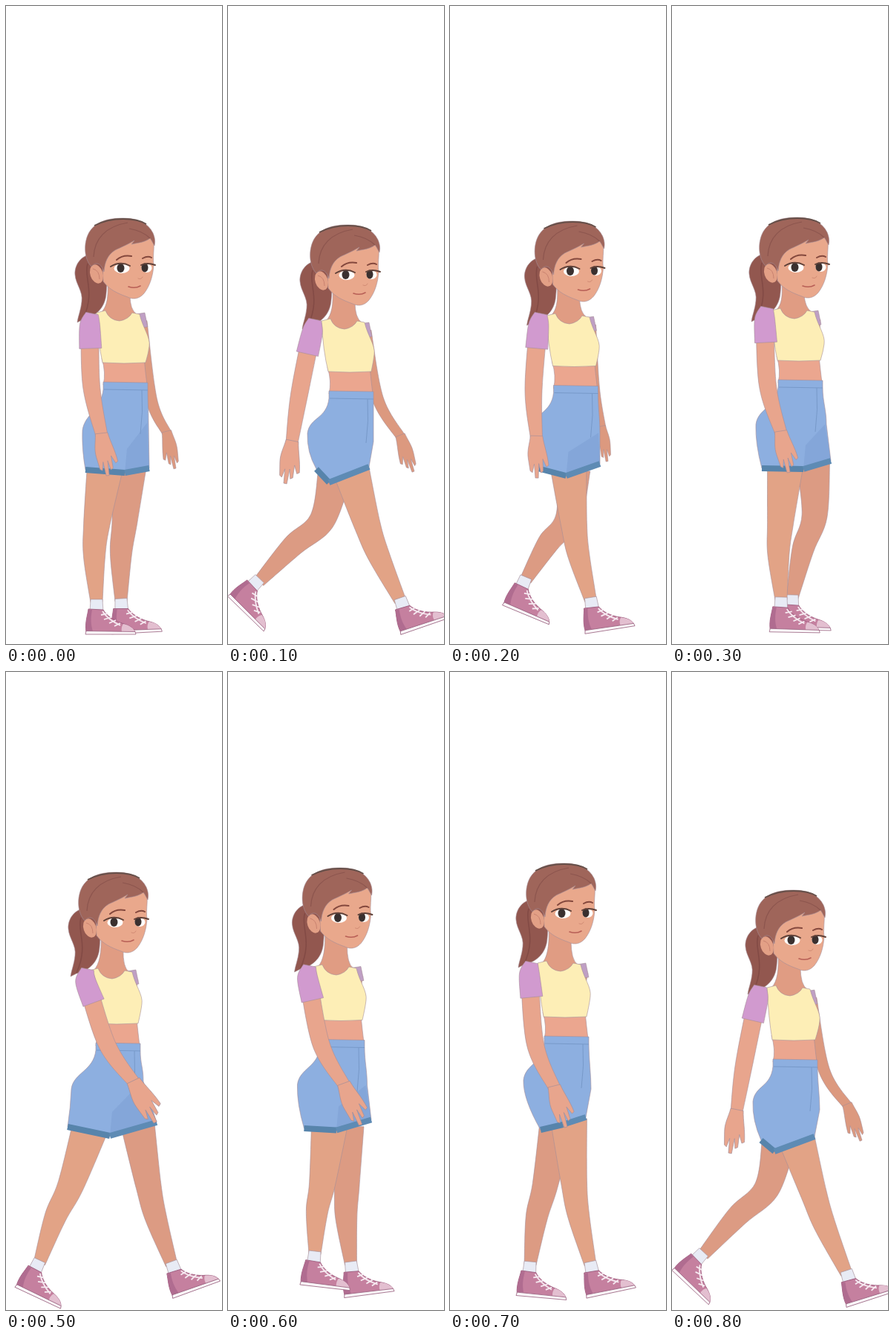
An HTML page that plays this animation: 291 px wide and 857 px high, repeating every 0.9 s.

```html
<!DOCTYPE html>
<html lang="en">
<head>
<meta charset="utf-8">
<title>Walk cycle</title>
<style>
html, body { margin: 0; width: 100%; height: 100%; overflow: hidden; background: #fff; }
svg { display: block; width: 100vw; height: 100vh; }
.line { stroke: #a58e98; stroke-width: .6; stroke-linejoin: round; }
</style>
</head>
<body>
<svg viewBox="0 0 291 857">
  <defs>
    <g id="shoe">
      <path class="line" fill="#e8ebf5" d="M-8 -1L8 -1L9 16L-9 16Z"/>
      <path fill="#c5809f" stroke="#99577a" stroke-width=".8" d="M-11 12L9 13C13 20 22 27 34 31C45 34 50 38 52 43L-14 43C-16 31 -12 20 -11 12Z"/>
      <path fill="#b06c90" d="M-11 13L-6 13C-8 24 -8 32 -5 42L-14 42C-15 31 -13 22 -11 13Z"/>
      <path fill="#e3bfd0" d="M36 32C45 34 50 38 52 43L34 43C33 38 34 35 36 32Z"/>
      <path fill="none" stroke="#f6eaf1" stroke-width="1.8" d="M8 15Q15 26 32 34M6 20L15 18M10 26L20 23M17 31L26 27M24 35L32 31"/>
      <path fill="#fbf8fa" stroke="#9a6380" stroke-width=".8" d="M-14 41.500L52 42.500L53 46L-15 46Z"/>
    </g>
    <path id="hand" class="line" d="M-8 -3C-9 9 -12 16 -10 27L-7 43L-4 45L-2 34L0 52L4 52L4 33L7 45L10 43L9 27L14 37L17 35C15 20 10 9 8 -3Z"/>
  </defs>

  <g id="tail">
    <path class="line" fill="#92574f" d="M116 333C101 335 92 348 93 361C94 374 104 383 102 397C101 408 97 417 96 425L104 421C122 417 134 404 135 386C137 370 136 348 129 340Z"/>
    <path fill="none" stroke="#824a45" stroke-width="1.500" d="M110 346C104 364 121 383 104 420"/>
  </g>
  <g id="stage"></g>
  <g id="head">
    <path fill="#e9a88c" class="line" d="M130 345L140 312L197 304C202 318 197 334 199 348C198 362 194 376 186 386C180 393 172 395 164 391C150 386 139 381 131 370Z"/>
    <ellipse cx="122" cy="360" rx="8.500" ry="13" fill="#e3a086" transform="rotate(-18 122 360)"/>
    <path fill="none" stroke="#c98270" d="M117 353Q126 355 126 367"/>
    <path fill="#9f655a" class="line" d="M115 350C105 340 104 318 112 304C122 288 140 285 158 285C178 285 192 292 198 305C201 312 201 317 200 322C198 319 197 316 194 312C188 317 179 318 169 320L173 315C163 321 155 324 147 328C137 334 133 344 132 357C128 345 121 343 115 350Z"/>
    <path fill="none" stroke="#8c554e" stroke-width="1.200" d="M118 337C119 313 134 296 164 291M194 312Q184 302 166 299"/>
    <path fill="none" stroke="#66504a" stroke-width="1.800" d="M119 295Q136 286 158 286Q178 286 189 293"/>
    <g fill="#fffdfb">
      <ellipse cx="156" cy="352.500" rx="10.500" ry="6.500"/>
      <ellipse cx="189.500" cy="352" rx="7" ry="6"/>
    </g>
    <g fill="#3a302f">
      <ellipse cx="154.500" cy="352" rx="5" ry="6"/>
      <ellipse cx="187" cy="351.500" rx="4.500" ry="6"/>
    </g>
    <g fill="none" stroke-linecap="round">
      <path stroke="#5e4038" stroke-width="1.900" d="M141 350Q154 342 167 349M182 348Q190 344 201 348"/>
      <path stroke="#84483d" stroke-width="2" d="M149 341Q157 334 169 336M184 339Q191 335 196 338"/>
      <path stroke="#b85f56" stroke-width="1.600" d="M165 377Q174 380 181 376"/>
      <path stroke="#d18b74" d="M178 366Q182 368 184 364"/>
    </g>
  </g>
</svg>
<script>
const STEP = 100, STEPS = 9;
const keyAt = [0, 1, 3, 5, 7, 8];

// head shift, chest shift, waist corner
const trunk = [
  [0, 0, 0, 0, 131, 505], [4, 9, 4, 11, 136, 517], [11, -1, 12, -3, 143, 502],
  [-9, -16, -10, -11, 121, 498], [-4, -28, -4, -21, 127, 489], [6, 8, 6, 12, 136, 520]
];
// seat, front, then back / middle / front of the hem
const shorts = [
  [103, 570, 192, 560, 107, 623, 160, 627, 193, 621],
  [107, 574, 196, 585, 119, 622, 136, 640, 190, 619],
  [113, 562, 208, 562, 121, 621, 177, 622, 214, 611],
  [88, 560, 185, 550, 83, 611, 140, 623, 203, 605],
  [99, 548, 190, 560, 122, 615, 152, 608, 183, 598],
  [109, 577, 199, 588, 120, 629, 138, 644, 192, 624]
];
// hip, knee, ankle, foot angle
const nearLeg = [
  [134, 616, 122, 698, 122, 798, 0], [166, 624, 188, 698, 232, 796, -19],
  [153, 613, 146, 695, 147, 795, 1], [114, 610, 87, 690, 45, 791, 25],
  [160, 602, 167, 685, 189, 793, -12], [168, 628, 191, 701, 235, 805, -18]
];
const farLeg = [
  [167, 616, 160, 692, 155, 797, -3], [143, 632, 126, 692, 42, 770, 44],
  [190, 613, 192, 685, 162, 792, 1], [178, 611, 192, 690, 223, 793, -20],
  [143, 610, 128, 690, 108, 793, 5], [143, 636, 127, 695, 42, 780, 43]
];
// shoulder, elbow, wrist, fingertips
const nearArm = [
  [113, 424, 115, 510, 129, 577, 135, 631], [114, 432, 96, 522, 86, 587, 75, 641],
  [125, 416, 129, 510, 147, 574, 155, 627], [107, 410, 136, 500, 173, 552, 199, 606],
  [107, 401, 115, 500, 141, 559, 154, 612], [116, 433, 97, 527, 87, 591, 76, 646]
];
const farArm = [
  [181, 424, 196, 529, 217, 574, 229, 621], [184, 437, 202, 528, 233, 579, 251, 625],
  [191, 421, 186, 500, 175, 555, 175, 598], [169, 412, 155, 490, 135, 543, 122, 588],
  [177, 403, 160, 490, 150, 543, 150, 583], [186, 439, 205, 535, 237, 583, 256, 629]
];

const NS = 'http://www.w3.org/2000/svg';
const stage = document.getElementById('stage');
const head = document.getElementById('head');
const tail = document.getElementById('tail');

function add(tag, attrs) {
  const el = document.createElementNS(NS, tag);
  for (const k in attrs) el.setAttribute(k, attrs[k]);
  return stage.appendChild(el);
}
const shape = fill => add('path', { fill, class: 'line' });
const band = stroke => add('path', { fill: 'none', stroke, 'stroke-width': 8 });
const copy = (id, fill) => add('use', { href: '#' + id, fill });

const part = {
  farArm: shape('#dc997f'), farHand: copy('hand', '#dc997f'), farSleeve: shape('#bf9fc4'),
  farLeg: shape('#dc9b83'), farShoe: copy('shoe'),
  nearLeg: shape('#e2a386'), nearShoe: copy('shoe'),
  belly: shape('#eba68f'), neck: shape('#e09c83'), shirt: shape('#fdeeb6'),
  shorts: shape('#8dafe0'), shade: add('path', { fill: '#7598cd' }),
  seam: add('path', { fill: 'none', stroke: '#7799c9' }),
  backHem: band('#5784ab'), frontHem: band('#5e8bb4'),
  nearArm: shape('#e8a58d'), nearHand: copy('hand', '#e8a58d'), sleeve: shape('#d19acf')
};
const draw = (name, d) => part[name].setAttribute('d', d);
const place = (el, t) => el.setAttribute('transform', t);
const mix = (a, b, u) => a + (b - a) * u;

// smooth curve through points
function curve(pts) {
  let d = '';
  for (let i = 0; i < pts.length - 1; i++) {
    const a = pts[i - 1] || pts[i], b = pts[i], c = pts[i + 1], e = pts[i + 2] || c;
    d += `C${b[0] + (c[0] - a[0]) / 6} ${b[1] + (c[1] - a[1]) / 6} ` +
         `${c[0] - (e[0] - b[0]) / 6} ${c[1] - (e[1] - b[1]) / 6} ${c[0]} ${c[1]}`;
  }
  return d;
}

// tapered limb along a bent line
function limb(pts, widths) {
  const left = [], right = [];
  pts.forEach(([x, y], i) => {
    const a = pts[i - 1] || pts[i], b = pts[i + 1] || pts[i];
    const dx = b[0] - a[0], dy = b[1] - a[1], k = widths[i] / 2 / Math.hypot(dx, dy);
    left.push([x - dy * k, y + dx * k]);
    right.unshift([x + dy * k, y - dx * k]);
  });
  return `M${left[0]}${curve(left)}L${right[0]}${curve(right)}Z`;
}

function drawLeg(side, [hx, hy, kx, ky, ax, ay, turn], widths) {
  const calf = [mix(kx, ax, .42) - 3, mix(ky, ay, .42)];
  draw(side + 'Leg', limb([[hx, hy], [kx, ky], calf, [ax, ay + 3]], widths));
  place(part[side + 'Shoe'], `translate(${ax} ${ay}) rotate(${turn})`);
}

function drawArm(side, [sx, sy, ex, ey, wx, wy, tx, ty], widths, flip) {
  draw(side + 'Arm', limb([[sx, sy], [ex, ey], [wx, wy]], widths));
  const dx = tx - wx, dy = ty - wy;
  const turn = Math.atan2(-dx, dy) * 180 / Math.PI, size = Math.hypot(dx, dy) / 52;
  place(part[side + 'Hand'], `translate(${wx} ${wy}) rotate(${turn}) scale(${size * flip} ${size})`);
}

function render(ms) {
  const step = Math.floor(ms / STEP) % STEPS;
  let i = 0;
  while (i < keyAt.length - 2 && keyAt[i + 1] <= step) i++;
  const u = (step - keyAt[i]) / (keyAt[i + 1] - keyAt[i]);
  const at = track => track[i].map((v, n) => mix(v, track[i + 1][n], u));
  const leg = track => {
    const p = at(track);
    if (track[i + 1][4] > track[i][4]) p[5] -= 13 * Math.sin(Math.PI * u);
    return p;
  };

  const [hx, hy, cx, cy, wx, wy] = at(trunk);
  const near = leg(nearLeg), far = leg(farLeg), arm = at(nearArm), back = at(farArm);
  const h = (x, y) => `${x + hx} ${y + hy} `;
  const c = (x, y) => `${x + cx} ${y + cy} `;
  const w = (x, y) => `${x + wx} ${y + wy} `;

  place(head, `translate(${hx} ${hy})`);
  place(tail, `translate(${hx} ${hy})`);

  drawArm('far', back, [18, 15, 12], -.85);
  draw('farSleeve', limb([[back[0], back[1] - 11], [back[0] + 3, back[1] + 8]], [12, 14]));
  drawLeg('far', far, [45, 34, 29, 16]);
  drawLeg('near', near, [49, 35, 29, 16]);

  draw('neck', `M${h(137, 370)}C${h(138, 392)}${c(136, 404)}${c(128, 412)}L${c(150, 428)}L${c(176, 414)}Q${c(167, 408)}${h(167, 388)}Z`);
  draw('belly', `M${w(-2, -32)}L${w(55, -32)}Q${w(57, -12)}${w(59, 4)}L${w(0, 4)}Q${w(4, -12)}${w(-2, -32)}Z`);
  draw('shirt', `M${c(122, 412)}L${c(134, 409)}Q${c(139, 422)}${c(153, 423)}Q${c(165, 421)}${c(170, 412)}L${c(180, 414)}` +
    `C${c(184, 432)}${c(195, 445)}${c(193, 457)}Q${c(192, 466)}${w(57, -26)}Q${w(28, -24)}${w(-1, -26)}Q${c(124, 452)}${c(122, 412)}Z`);

  const [sx, sy, fx, fy, lx, ly, mx, my, rx, ry] = at(shorts);
  draw('shorts', `M${w(0, 0)}L${w(60, 1)}L${w(60, 10)}C${w(60, 30)}${fx} ${fy - 20} ${fx} ${fy}L${rx} ${ry}L${mx} ${my}L${lx} ${ly}` +
    `Q${sx - 1} ${sy + 25} ${sx} ${sy}C${sx + 3} ${sy - 22} ${w(-3, 38)}${w(0, 10)}Z`);
  draw('shade', `M${mx} ${my}L${mx + 3} ${my - 32}L${fx - 2} ${fy}L${rx} ${ry}Z`);
  part.shade.setAttribute('opacity', far[0] > near[0] ? .4 : 0);
  draw('seam', `M${w(1, 10)}L${w(60, 11)}M${w(52, 11)}Q${w(54, 40)}${w(50, 70)}`);
  draw('backHem', `M${lx} ${ly}L${mx} ${my}`);
  draw('frontHem', `M${mx} ${my}L${rx} ${ry}`);

  drawArm('near', arm, [24, 23, 16], 1);
  const [ax, ay, ex, ey] = arm, k = 36 / Math.hypot(ex - ax, ey - ay);
  draw('sleeve', limb([[ax + 3, ay - 11], [ax, ay + 4], [mix(ax, ex, k), mix(ay, ey, k)]], [17, 27, 30]));
}

const start = performance.now();
function tick() {
  render(performance.now() - start);
  requestAnimationFrame(tick);
}
tick();
</script>
</body>
</html>
```
